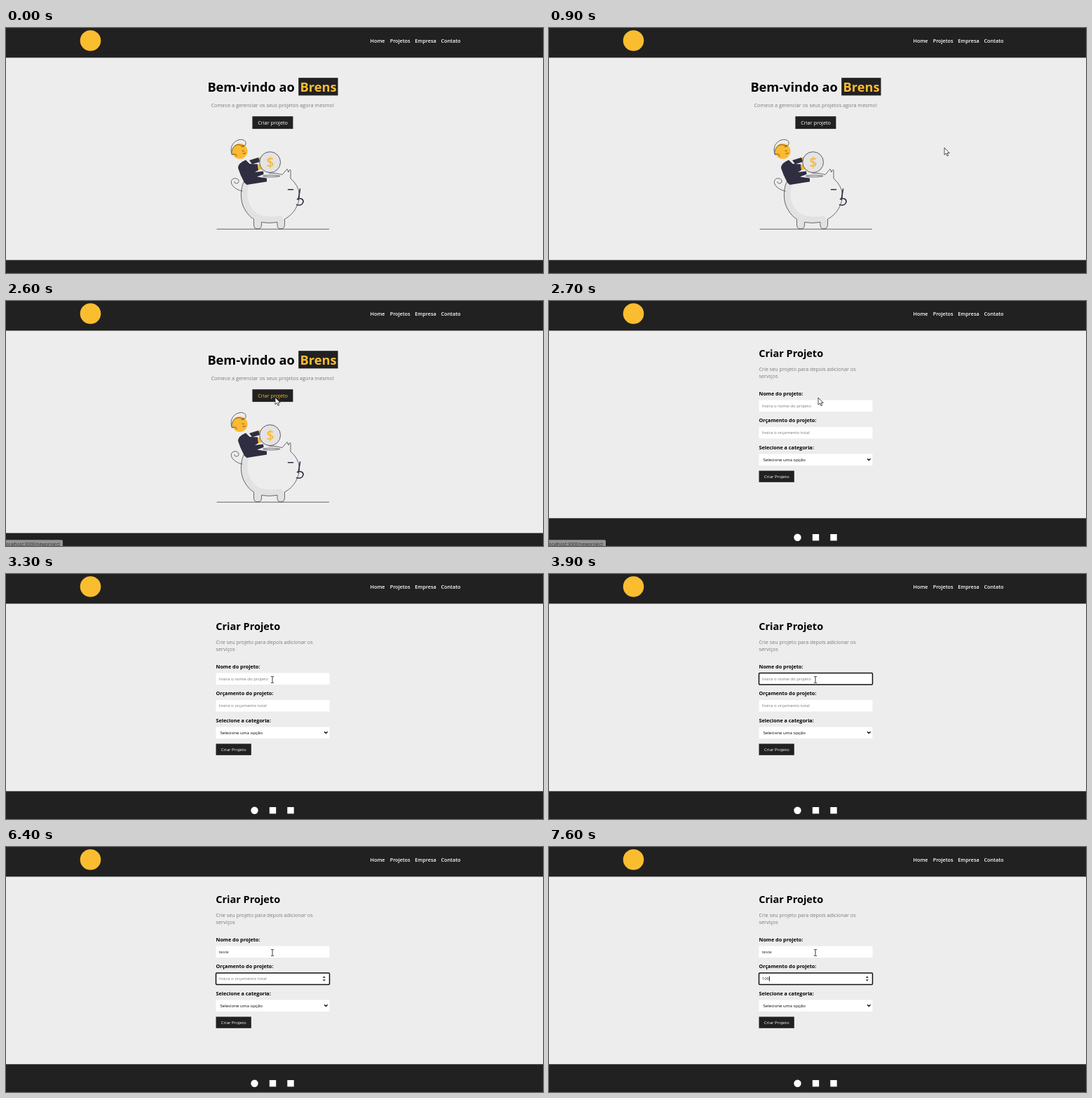
An HTML page that plays this animation: 766 px wide and 350 px high, repeating every 8 s.

```html
<!DOCTYPE html>
<html lang="pt">
<head>
<meta charset="utf-8">
<style>
html, body { margin: 0; width: 100%; height: 100%; overflow: hidden; background: #ededed; }
svg { display: block; font: 7.24px "Open Sans", sans-serif; }
.dark { fill: #212121; }
.bold { font-weight: 700; }
.medium { font-weight: 500; }
.gray { fill: #7b7b7b; }
.white { fill: #fff; }
.small { font-size: 6.1px; }
.line { fill: none; stroke: #3a3945; stroke-width: .75; stroke-linecap: round; stroke-linejoin: round; }
.thick { stroke: #2f2e41; stroke-width: 1.6; }
.suit { fill: #2f2e41; }
.gold { fill: #fdb92f; }
</style>
</head>
<body>
<svg width="766" height="350" viewBox="0 0 766 350">
  <rect width="766" height="350" fill="#ededed"/>
  <rect class="dark" width="766" height="42.4"/>
  <circle cx="120.5" cy="18" r="14.8" fill="#fbbd30"/>
  <g class="white" font-weight="600">
    <text x="519.6" y="21.3">Home</text>
    <text x="547.7" y="21.3">Projetos</text>
    <text x="583.3" y="21.3">Empresa</text>
    <text x="620.5" y="21.3">Contato</text>
  </g>

  <g id="home">
    <text class="bold" x="287.4" y="90.5" font-size="18.2">Bem-vindo ao</text>
    <rect class="dark" x="417.2" y="71.2" width="56.3" height="25.2"/>
    <text class="bold" x="445.5" y="90.5" font-size="18.2" text-anchor="middle" fill="#ffbb33">Brens</text>
    <text class="gray" x="292.5" y="113.2" font-size="7.32">Comece a gerenciar os seus projetos agora mesmo!</text>
    <rect class="dark" x="351.4" y="126.2" width="58" height="17.9"/>
    <text id="link" class="medium" x="380.6" y="138.2" text-anchor="middle">Criar projeto</text>

    <!-- piggy bank -->
    <path fill="#e2e2e2" d="M345 213C334 224 332 246 340 258C344 266 349 270 354 273V285Q359 288 364 285V278H388V285Q392 288 397 285V274L392 268Q374 272 360 266C343 256 340 232 351 215Z"/>
    <path class="line" d="M343 214C334 223 333 246 340 258Q346 269 353.5 273V281Q353.5 287 359 287T364.5 281V277.5Q375 279.5 387 277.5V281Q387 287 392 287T397.5 281V273C411 266 418.5 252 418.5 238Q417.5 225 406 215V203Q403 202 403 206L401 201.5L394 209.5Q386 207 375 207"/>
    <path class="line" d="M337 233C327 231 320 224 321.5 218.5C323 213 332 214 332 219C332 223 325 223 326 219.5M301 287.3H460.5"/>
    <ellipse class="line" cx="378.5" cy="211.5" rx="12" ry="1.3"/>
    <path class="line thick" d="M402.5 230.8H409.5M419.5 230L417 245M415.5 244.5C420 242 425 245 423.8 249C422.5 253 418 253.5 414.5 252.5"/>

    <!-- saver -->
    <circle class="gold" cx="333.5" cy="176" r="11"/>
    <path class="line" d="M322.5 181C318 171 324 162 332 159.8C339 158 344 162 341.5 167C339 171 333 164 327 168C323 171 321 177 322.5 181Q328 178 329 183"/>
    <path class="line" d="M336 169.5L339.5 168.8M337 175.5Q338.5 176.5 339.5 175.5M338 179.5Q340 180 341.5 178.5"/>
    <path class="suit" d="M331 200Q331 193 342 188.500L347.5 194L359 194.5L360 203L355 206L367 204.5L367.5 209L358 212.5L372 214.5V219.5L343.500 224L340 221Q334 210 331 200Z"/>
    <path class="suit" d="M347 189L360 185L363 191L351 194.5Z"/>
    <path class="gold" d="M360.5 185L364 184L363.5 191H362ZM359.5 195H364.5L365 202L360 203Z"/>
    <circle cx="376.6" cy="191.7" r="14.9" fill="#e3e3e3" stroke="#3a3945" stroke-width=".8"/>
    <text class="gold" x="376.7" y="198.6" font-size="19.500" font-weight="600" text-anchor="middle">$</text>
    <rect class="dark" y="331.5" width="766" height="18.5"/>
  </g>

  <g id="form">
    <text class="bold" x="299.3" y="79.5" font-size="14.48">Criar Projeto</text>
    <text class="gray" x="299.5" y="99.5">Crie seu projeto para depois adicionar os</text>
    <text class="gray" x="299.5" y="109.8">serviços</text>
    <g class="bold">
      <text x="299.5" y="135">Nome do projeto:</text>
      <text x="299.5" y="173.3">Orçamento do projeto:</text>
      <text x="299.5" y="211.7">Selecione a categoria:</text>
    </g>
    <g class="white">
      <rect x="299.5" y="141.5" width="162" height="16.5"/>
      <rect x="299.5" y="180" width="162" height="16.5"/>
      <rect x="299.5" y="218.5" width="162" height="16.5"/>
    </g>
    <rect id="ring" x="299.5" width="162" height="16.3" rx="1.2" fill="none" stroke="#111" stroke-width="1.5"/>
    <g class="small">
      <text id="name" x="303.7" y="152"></text>
      <text id="budget" x="303.7" y="190.4"></text>
      <text x="305.5" y="228.9">Selecione uma opção</text>
    </g>
    <path d="M454 225.3L456.3 227.5L458.6 225.3" fill="none" stroke="#111" stroke-width="1.4"/>
    <path id="spin" d="M451.7 187L453.8 184.3L455.9 187ZM451.7 189.3L453.8 192L455.9 189.3Z" fill="#444"/>
    <rect id="caret" width=".8" height="7.5" fill="#111"/>
    <rect class="dark" x="299.5" y="242.5" width="50.3" height="16.3"/>
    <text class="white small medium" x="324.7" y="252.9" text-anchor="middle">Criar Projeto</text>
    <rect class="dark" y="310.3" width="766" height="39.7"/>
    <g class="white">
      <circle cx="354.5" cy="337.7" r="5.2"/>
      <rect x="375.8" y="333" width="9.4" height="9.4"/>
      <rect x="401.3" y="333" width="9.4" height="9.4"/>
    </g>
  </g>

  <g id="status">
    <path d="M0 341.2H79Q81 341.2 81 343.2V350H0Z" fill="#949494"/>
    <text x="76.7" y="349.5" font-size="6.4" text-anchor="end" fill="#2c2c2c">localhost:3000/newproject</text>
  </g>
  <path id="arrow" d="M0 0V10.2L2.4 8L4 11.8L5.6 11.1L4 7.5H7.2Z" fill="#fff" stroke="#222" stroke-width=".8"/>
  <path id="beam" d="M-2-4.5H-.5L0-4L.5-4.5H2M0-4V4M-2 4.5H-.5L0 4L.5 4.5H2" fill="none" stroke="#222" stroke-width=".9"/>
</svg>
<script>
const LOOP = 8000, STEP = 100, BLINK = 500;
const $ = id => document.getElementById(id);
const show = (id, on) => $(id).style.display = on ? '' : 'none';
const move = (id, x, y) => $(id).setAttribute('transform', `translate(${x} ${y})`);

// Pointer stops: time, x, y
const stops = [[100, 171, 247], [900, 564, 171], [1000, 596, 160], [1100, 591, 168], [1500, 591, 168],
  [1700, 525, 144], [1800, 445, 130], [2000, 407, 133], [2400, 384, 137], [3000, 384, 139], [3300, 380, 151]];
const nameKeys = [4300, 4400, 4600, 4800, 5400];
const budgetKeys = [6900, 7400, 7600];
const FOCUS_NAME = 3400, FOCUS_BUDGET = 5900;

function pointer(t) {
  const i = stops.findIndex(s => s[0] > t);
  if (i < 0) return stops[stops.length - 1].slice(1);
  const [t0, x0, y0] = stops[Math.max(i - 1, 0)], [t1, x1, y1] = stops[i];
  const k = Math.max(0, (t - t0) / (t1 - t0));
  return [x0 + (x1 - x0) * k, y0 + (y1 - y0) * k];
}

function field(id, value, keys, hint, t) {
  const typed = value.slice(0, keys.filter(k => k <= t).length);
  $(id).textContent = typed || hint;
  $(id).setAttribute('fill', typed ? '#222' : '#777');
  return typed ? $(id).getComputedTextLength() : 0;
}

function draw(t) {
  const onForm = t >= 2700, [x, y] = pointer(t);
  show('home', !onForm);
  show('form', onForm);
  show('status', t >= 2300 && t < 3100);
  show('arrow', t >= 100 && t < 3100);
  show('beam', t >= 3100);
  move('arrow', x, y);
  move('beam', x, y);

  const hover = Math.min(1, Math.max(0, (t - 2100) / 400));
  $('link').setAttribute('fill', `rgb(255 ${255 - 68 * hover} ${255 - 204 * hover})`);

  if (!onForm) return;
  const nameWidth = field('name', 'teste', nameKeys, 'Insira o nome do projeto', t);
  const budgetWidth = field('budget', '100', budgetKeys, 'Insira o orçamento total', t);
  const second = t >= FOCUS_BUDGET, focused = t >= FOCUS_NAME;
  show('ring', focused);
  show('spin', second);
  $('ring').setAttribute('y', second ? 180.1 : 141.6);

  const marks = second ? [FOCUS_BUDGET, ...budgetKeys] : [FOCUS_NAME, ...nameKeys];
  const since = t - Math.max(...marks.filter(m => m <= t));
  show('caret', focused && Math.floor(since / BLINK) % 2 === 0);
  move('caret', 303.7 + (second ? budgetWidth : nameWidth), second ? 184.4 : 146);
}

function tick(now) {
  draw(Math.floor(now % LOOP / STEP) * STEP);
  requestAnimationFrame(tick);
}
requestAnimationFrame(tick);
</script>
</body>
</html>
```
